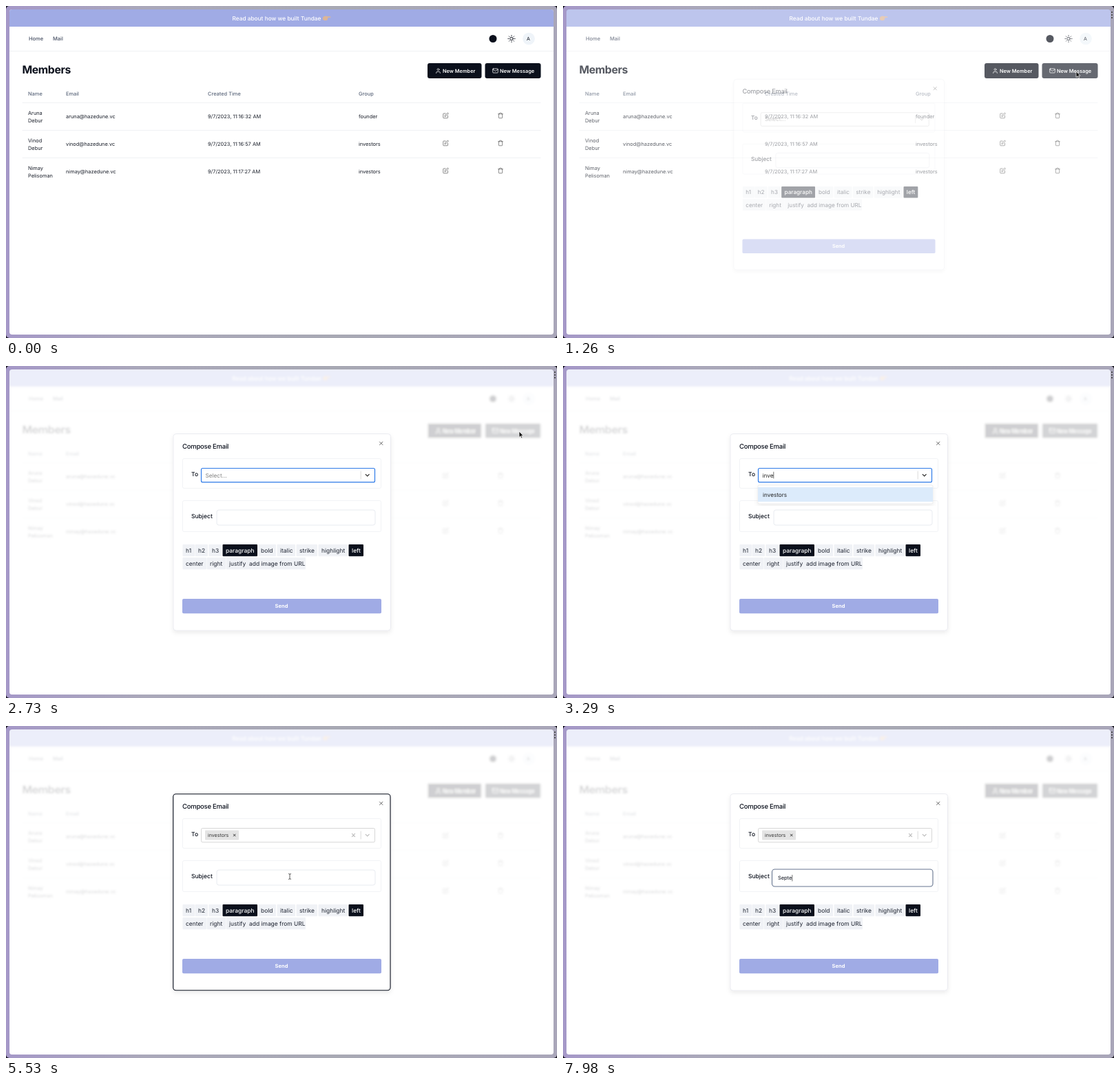
These frames come from a looping animation (800x482 px, 8 s). An HTML page:

```html
<!DOCTYPE html>
<html lang="en">
<head>
<meta charset="utf-8">
<style>
  html, body { margin: 0; width: 100%; height: 100%; overflow: hidden; background: #15131c; }
  svg { display: block; font-family: Inter, Roboto, sans-serif; text-rendering: geometricPrecision; }
  .icon { fill: none; stroke-linecap: round; stroke-linejoin: round; }
</style>
</head>
<body>
<svg id="stage" width="800" height="482" viewBox="0 0 800 482"></svg>
<script>
const LOOP = 8000;
const INK = '#0b101c', BODY = '#1a1f2a', SLATE = '#5d687c', LINE = '#eceef2', BRAND = '#a0abe5';

const text = (x, y, size, str, fill = INK, weight = 400, more = '') =>
  `<text x="${x}" y="${y}" font-size="${size}" fill="${fill}" font-weight="${weight}" ${more}>${str}</text>`;
const box = (x, y, w, h, fill, stroke = 'none', r = 0, more = '') =>
  `<rect x="${x}" y="${y}" width="${w}" height="${h}" rx="${r}" fill="${fill}" stroke="${stroke}" ${more}/>`;
const path = (d, stroke, width = 1, more = '') =>
  `<path class="icon" d="${d}" stroke="${stroke}" stroke-width="${width}" ${more}/>`;
const rule = y => path(`M24 ${y}H776`, LINE, .8);
const cross = (x, y, r, color, width = 1) =>
  path(`M${x - r} ${y - r}l${2 * r} ${2 * r}m0 ${-2 * r}l${-2 * r} ${2 * r}`, color, width);
// Icons are drawn on a 24-unit grid centred on (x, y).
const icon = (x, y, size, color, d, width = 2) =>
  path(d, color, width, `transform="translate(${x - size / 2} ${y - size / 2}) scale(${size / 24})"`);

const EDIT = 'M11 4H4a2 2 0 0 0-2 2v14a2 2 0 0 0 2 2h14a2 2 0 0 0 2-2v-7M18.5 2.5a2 2 0 0 1 3 3L12 15l-4 1 1-4z';
const TRASH = 'M3 6h18M19 6v14a2 2 0 0 1-2 2H7a2 2 0 0 1-2-2V6M8 6V4a2 2 0 0 1 2-2h4a2 2 0 0 1 2 2v2';
const USER = 'M20 22v-2a4 4 0 0 0-4-4H8a4 4 0 0 0-4 4v2M16 7a4 4 0 1 1-8 0a4 4 0 0 1 8 0z';
const MAIL = 'M4 4h16a2 2 0 0 1 2 2v12a2 2 0 0 1-2 2H4a2 2 0 0 1-2-2V6a2 2 0 0 1 2-2zM22 7l-10 6L2 7';
const SUN = 'M17 12a5 5 0 1 1-10 0a5 5 0 0 1 10 0zM12 1v2M12 21v2M4.2 4.2l1.4 1.4M18.4 18.4l1.4 1.4' +
  'M1 12h2M21 12h2M4.2 19.8l1.4-1.4M18.4 5.6l1.4-1.4';

const members = [
  ['Aruna', 'Debur', 'aruna', '16:32', 'founder'],
  ['Vinod', 'Debur', 'vinod', '16:57', 'investors'],
  ['Nimay', 'Pelisoman', 'nimay', '17:27', 'investors'],
];

function memberRow([first, last, user, time, group], i) {
  const y = 160.5 + 40 * i;
  return rule(y - 20) +
    text(32, y - 2.8, 7.4, first, BODY) + text(32, y + 8.2, 7.4, last, BODY) +
    text(87, y + 2.7, 7.4, user + '@hazedune.vc', BODY) +
    text(293, y + 2.7, 7.4, `9/7/2023, 11:${time} AM`, BODY) +
    text(512, y + 2.7, 7.4, group, BODY) +
    icon(638.5, y - 1.5, 9, '#666', EDIT) + icon(718, y - 1.5, 9, '#666', TRASH);
}

const page = box(5, 5, 790, 472, '#fff') + box(5, 5, 790, 25, BRAND) +
  text(328.5, 21, 8.3, 'Read about how we built Tundae', '#fff', 500) +
  '<path d="M460 16.5q3-3 6-1.5l5 .2q1 1 0 1.6h-4q1 1 0 2q0 2-2 2.2h-3l-2-1.500z" fill="#dcb596"/>' +
  text(33, 50, 7.5, 'Home', '#475064', 500) + text(68, 50, 7.5, 'Mail', '#475064', 500) +
  `<circle cx="707" cy="47.500" r="5.500" fill="${INK}"/>` +
  icon(734, 47.5, 11, INK, SUN) +
  '<circle cx="759" cy="47.500" r="8.800" fill="#eff4f9"/>' +
  text(758.5, 50, 7, 'A', INK, 400, 'text-anchor="middle"') +
  path('M5 65.500H795', LINE, .8) +
  text(23.5, 98, 15.8, 'Members', INK, 700, 'letter-spacing="-.4"') +
  box(612, 83, 78.5, 22, INK, 'none', 3) + icon(627.5, 94, 8.5, '#fff', USER) +
  text(634, 96.7, 7.35, 'New Member', '#fff', 600) +
  `<g id="newMsg">${box(695.5, 83, 81, 22, INK, 'none', 3)}</g>` + icon(710.5, 94, 9, '#fff', MAIL) +
  text(717, 96.7, 7.35, 'New Message', '#fff', 600) +
  [[32, 'Name'], [87, 'Email'], [293, 'Created Time'], [512, 'Group']]
    .map(([x, s]) => text(x, 129.7, 7.42, s, SLATE, 500)).join('') +
  members.map(memberRow).join('');

const tools = [
  [261, 'h1', 9], [279, 'h2', 10], [299, 'h3', 10], [319, 'paragraph', 42], [370, 'bold', 18],
  [398, 'italic', 18], [426, 'strike', 22], [458, 'highlight', 34], [502, 'left', 13],
  [261, 'center', 26], [296, 'right', 19], [324, 'justify', 25], [353, 'add image from URL', 82],
];
function tool([x, label, w], i) {
  const y = i < 9 ? 259 : 278, on = label === 'paragraph' || label === 'left';
  const pad = i === 12 ? .5 : 4.5;
  return box(x - pad, y, w + 2 * pad - .5, 17.2, on ? INK : '#f0f2f6', 'none', 1) +
    text(x, y + 11.7, 8.45, label, on ? '#fff' : '#1d2330', on ? 500 : 400);
}

const dialog = box(243, 98.5, 315.5, 285.5, '#fff', '#e6e8ee', 4, 'filter="url(#shadow)" stroke-width=".8"') +
  text(256, 120.3, 9.5, 'Compose Email', INK, 500, 'letter-spacing="-.24"') + cross(544.7, 112.3, 2.2, '#444', .8) +
  box(256.5, 134.5, 288, 43, 'none', LINE, 2, 'stroke-width=".7"') +
  box(256.5, 195.5, 288, 45, 'none', LINE, 2, 'stroke-width=".7"') +
  text(269, 159.5, 8.5, 'To', INK, 500) + text(269, 221.3, 8.5, 'Subject', INK, 500) +
  tools.map(tool).join('') +
  box(256, 338, 289, 21.3, BRAND, 'none', 2) +
  text(400, 351.3, 7.5, 'Send', '#fff', 700, 'text-anchor="middle"') +
  '<g id="fields"></g>';

document.getElementById('stage').innerHTML = `
  <defs>
    <linearGradient id="desk"><stop offset="0" stop-color="#a598c8"/><stop offset=".25" stop-color="#aaa8ba"/>
      <stop offset=".6" stop-color="#a8a9b4"/><stop offset="1" stop-color="#a9a6b9"/></linearGradient>
    <clipPath id="win">${box(5, 5, 790, 472, '#fff', 'none', 4)}</clipPath>
    <filter id="blur" x="0" y="0" width="1" height="1"><feGaussianBlur id="soft" stdDeviation="0"/></filter>
    <filter id="shadow"><feDropShadow dx="0" dy="3" stdDeviation="3" flood-opacity=".08"/></filter>
  </defs>
  ${box(0, 0, 800, 482, 'url(#desk)', 'none', 5)}
  <g clip-path="url(#win)"><g id="page">${page}</g>
    <g id="veil">${box(5, 5, 790, 472, '#fff')}</g></g>
  <g id="dialog">${dialog}</g>
  <g id="dots" fill="#333">${[9, 13, 17].map(y => `<circle cx="797" cy="${y}" r="1"/>`).join('')}</g>
  <g id="arrow">
    <path d="M0 0V8.500L2 6.700L3.400 9.700L4.800 9.100L3.400 6.200H6z" fill="#111" stroke="#fff" stroke-width=".7"/></g>
  <g id="beam">${path('M-1.500-4Q0-4 0-3V3Q0 4-1.500 4M1.500-4Q0-4 0-3M0 3Q0 4 1.500 4', '#333', .8)}</g>`;

const $ = id => document.getElementById(id);
const clamp = v => Math.max(0, Math.min(1, v));
const typed = (word, times, t) => word.slice(0, times.filter(at => t >= at).length);
const show = (id, on) => $(id).setAttribute('display', on ? 'inline' : 'none');
const caret = (x, y, h) => path(`M${x} ${y}v${h}`, '#333', .7);

// Cursor keyframes: time, x, y
const route = [[350, 799, 40], [850, 745, 95], [4060, 745, 95], [4550, 416, 218.5], [4760, 416, 218.5], [5250, 412, 218.5]];
function cursorAt(t) {
  const i = route.findIndex(k => k[0] > t);
  if (i < 1) return i ? route.at(-1).slice(1) : route[0].slice(1);
  const [t0, x0, y0] = route[i - 1], [t1, x1, y1] = route[i];
  const p = (t - t0) / (t1 - t0), e = p * p * (3 - 2 * p);
  return [x0 + (x1 - x0) * e, y0 + (y1 - y0) * e];
}

function fields(t) {
  const toFocus = t >= 1330 && t < 5250, ring = t >= 5250 && t < 6160, subjFocus = t >= 6160;
  const picked = t >= 3640;
  const query = picked ? '' : typed('inve', [2940, 3010, 3150, 3290], t);
  const glyph = toFocus ? '#222' : '#bbb';
  let s = box(283.5, 148.5, 252, 20.2, '#fff', toFocus ? '#2f7be8' : '#ccc', 2, `stroke-width="${toFocus ? 1.2 : .8}"`) +
    path('M515.200 153v11', '#ccc', .7) + path('M522.200 157.300l2.500 2.500l2.500-2.500', glyph, 1.2);

  if (picked) {
    s += box(289, 151.5, 49, 14, '#e4e4e4', 'none', 1) + text(293, 161, 7.06, 'investors', '#333') +
      cross(331.7, 158.5, 1.4, '#333', 1) + cross(504.5, 158.5, 2.1, glyph, 1.1);
    if (toFocus && (t - 3640) % 1060 < 530 || t > 4550 && t < 4700) s += caret(340.3, 154, 9);
  } else if (query) {
    s += text(289.5, 161.5, 8.2, query, '#222') +
      caret(289.8 + [0, 2, 6.9, 11.5, 16][query.length], 154, 9);
  } else {
    s += text(289.5, 161.5, 8.2, 'Select...', '#808080');
  }

  if (subjFocus) {
    const subject = typed('Septe', [7000, 7210, 7490, 7700, 7980], t);
    s += box(303.5, 208, 233.5, 25, '#fff', '#66758f', 4, 'stroke-width="1.1"') +
      text(312, 223.3, 7.4, subject);
    if (subject || t % 1000 < 500) s += caret(312 + [0, 4.8, 9.1, 13.7, 16.4, 20.8][subject.length], 216.5, 8.5);
  } else {
    s += box(306, 209, 230, 22, '#fff', '#e3e6ec', 3, 'stroke-width=".8"');
  }

  if (query) {
    s += box(283, 173, 254, 27, '#fff', '#e3e3e3', 2, 'stroke-width=".6" filter="url(#shadow)"') +
      box(283, 176, 254, 21, '#dcebfb') + text(290, 189.5, 8.2, 'investors', '#222');
  }
  if (ring) s += box(242.7, 98.7, 315.3, 285, 'none', INK, 4, 'stroke-width="1.1"');
  return s;
}

let last = '';
function render(t) {
  const p = clamp((t - 1200) / 160);
  $('veil').setAttribute('opacity', .8 * p);
  const blur = 1.4 * clamp((t - 1260) / 140);
  $('soft').setAttribute('stdDeviation', blur);
  if (blur) $('page').setAttribute('filter', 'url(#blur)');
  else $('page').removeAttribute('filter');

  const scale = .95 + .05 * p;
  show('dialog', p > 0);
  $('dialog').setAttribute('opacity', p);
  $('dialog').setAttribute('transform',
    `translate(400 ${241 + 5.6 * (1 - p)}) scale(${scale}) translate(-400 -241)`);

  const html = fields(t);
  if (html !== last) $('fields').innerHTML = last = html;

  const [x, y] = cursorAt(t);
  const inField = x < 536 && y > 190;
  const visible = t >= 350 && t < 2940 || t >= 4060 && t < 7000;
  show('arrow', visible && !inField);
  show('beam', visible && inField);
  $(inField ? 'beam' : 'arrow').setAttribute('transform', `translate(${x} ${y})`);
  show('dots', t >= 350);
  $('newMsg').setAttribute('opacity', t >= 800 ? .9 : 1);
}

function tick() {
  render(performance.now() % LOOP);
  requestAnimationFrame(tick);
}
tick();
</script>
</body>
</html>
```
